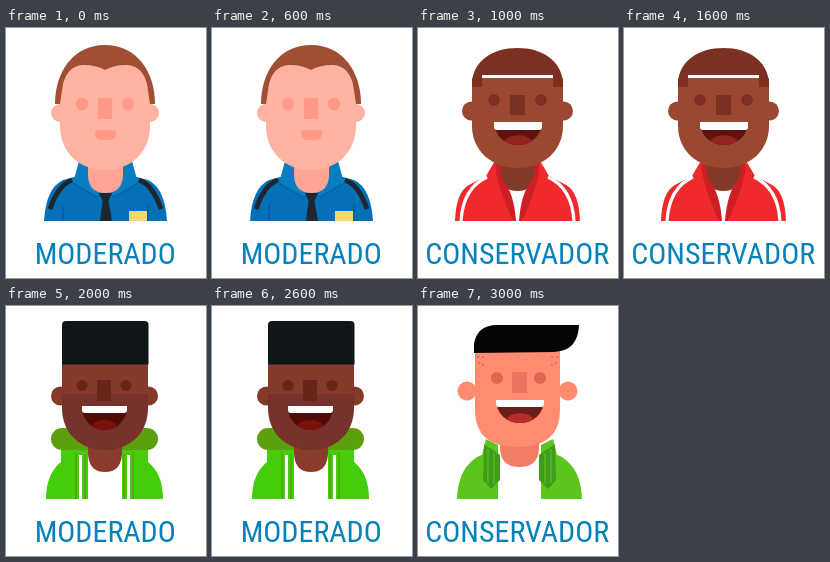
An HTML page with a canvas that plays this animation: 200 by 250 pixels, repeating every 4000 ms.

```html
<!DOCTYPE html>
<html lang="es">
<head>
<meta charset="utf-8">
<style>
html, body { margin: 0; width: 100%; height: 100%; overflow: hidden; background: #fff; }
canvas { display: block; width: 200px; height: 250px; }
</style>
</head>
<body>
<canvas id="stage" width="200" height="250"></canvas>
<script>
const ctx = document.getElementById('stage').getContext('2d');
const HOLD = 1000;

function shape(color, d) {
  ctx.fillStyle = color;
  ctx.fill(new Path2D(d));
}

function line(color, width, d) {
  ctx.strokeStyle = color;
  ctx.lineWidth = width;
  ctx.stroke(new Path2D(d));
}

function box(color, x, y, w, h, r = 0) {
  ctx.fillStyle = color;
  ctx.beginPath();
  ctx.roundRect(x, y, w, h, r);
  ctx.fill();
}

function dot(color, x, y, r) {
  ctx.fillStyle = color;
  ctx.beginPath();
  ctx.arc(x, y, r, 0, Math.PI * 2);
  ctx.fill();
}

// Runs a drawing twice, the second time flipped about the vertical line x = axis.
function mirror(axis, draw) {
  draw();
  ctx.save();
  ctx.translate(2 * axis, 0);
  ctx.scale(-1, 1);
  draw();
  ctx.restore();
}

function smile(x, y, w, teeth, depth, dark, tongue) {
  ctx.save();
  ctx.beginPath();
  ctx.roundRect(x, y, w, depth, [0, 0, w / 2, w / 2]);
  ctx.clip();
  box(dark, x, y, w, depth);
  ctx.fillStyle = tongue;
  ctx.beginPath();
  ctx.ellipse(x + w / 2, y + depth, w * 0.32, depth * 0.42, 0, 0, Math.PI * 2);
  ctx.fill();
  ctx.restore();
  box('#fff', x, y, w, teeth, [0, 0, 3, 3]);
}

function caption(text) {
  ctx.fillStyle = '#0582bb';
  ctx.textAlign = 'center';
  ctx.fontStretch = 'condensed';
  ctx.font = '30px "Roboto Condensed", Roboto, sans-serif';
  ctx.fillText(text, 99.2, 236);
}

function officer() {
  const skin = '#ffb3a0', shade = '#fe9a87', blue = '#0470b7', navy = '#20262e';
  shape(blue, 'M38 193Q40 160 57 152L72 148L73 135H126L127 148L142 152Q159 160 161 193Z');
  mirror(99.5, () => {
    line(navy, 5, 'M66 152Q52 157 44 181');
    shape('#0a7cc0', 'M73 133L67 155L91 169L99 163L82 136Z');
    line('#035a98', 1, 'M67 155L91 169L99 163');
    line('#035a98', 1.2, 'M57 176V193');
  });
  shape('#ffa593', 'M82 130H117V148Q116 165 99.5 165T82 148Z');
  shape(navy, 'M93 165H106L102.5 173L106 193H94L96.5 173Z');
  box('#fbd66b', 123, 183, 18, 10);
  mirror(99, () => dot(skin, 54, 85, 9));
  shape('#a04e34', 'M49 76C49 44 67 17 99 17S149 44 149 76Z');
  shape(skin, 'M54 76L57 56Q62 37 78 37Q90 37 99 42Q108 37 120 37Q136 37 141 56L144 76V98C144 124 125 142 99 142S54 124 54 98Z');
  mirror(99, () => dot(shade, 76, 76, 6.3));
  box(shade, 92, 70, 14, 21);
  box(shade, 89, 102, 21, 10, [2, 2, 6, 6]);
}

function athlete() {
  const skin = '#9b4833', shade = '#7b3021', red = '#f0292d', dark = '#cd2026';
  shape(red, 'M37 193Q38 164 51 157L68 148L78 131H121L131 148L148 157Q161 164 162 193Z');
  shape('#fff', 'M82 142H117L104 193H95Z');
  shape('#843a28', 'M82 128H117V146Q116 163 99.5 163T82 146Z');
  mirror(99.5, () => {
    shape(dark, 'M78 130Q74 147 95 193H98Q96 165 85 152Q81 144 83 133Z');
    line('#fff', 3.2, 'M69 149Q45 160 43 193');
  });
  mirror(99.5, () => dot(skin, 53.5, 83, 9.5));
  shape(skin, 'M54 50H145V98C145 123 125 140 99.5 140S54 123 54 98Z');
  shape(shade, 'M54 59V54C56 33 74 20 99.5 20S143 33 145 54V59H135V47H64V59Z');
  mirror(99.5, () => dot(shade, 76, 72, 5.8));
  box(shade, 92, 67, 15, 20);
  smile(76, 94, 48, 8, 23, '#5f120e', '#94231f');
}

function flatTop() {
  const skin = '#853a29', beard = '#76322a', shade = '#672419', green = '#43cd0b', hood = '#5ba00f';
  mirror(98.5, () => {
    shape(green, 'M55 142H82V193H40Q40 168 55 156Z');
    line(hood, 1.5, 'M70 146V193M79 148V193');
    line('#fff', 3, 'M74.5 149V193');
  });
  box(hood, 45, 122, 107, 22, 11);
  shape('#fff', 'M82 144H116V193H82Z');
  shape('#8b3d2b', 'M82 128H116V148Q115 166 99 166T82 148Z');
  mirror(98.5, () => dot(skin, 54.5, 90, 9.5));
  shape(skin, 'M56 50H142V100H56Z');
  shape(beard, 'M56 88H142V102C142 128 123 144 99 144S56 128 56 102Z');
  box('#101617', 56, 15, 86.5, 43.5, [4, 4, 0, 0]);
  mirror(98, () => dot(shade, 76, 79.5, 5.5));
  box(shade, 91, 74, 14, 21);
  smile(76, 100, 45, 7, 24, '#500a07', '#7d100c');
}

function quiff() {
  const skin = '#ff8b71', shade = '#df6652', green = '#5bc51d', dark = '#3f9c1d';
  mirror(101.5, () => {
    shape(green, 'M68 133L80 139V193H39Q40 169 51 158Q57 151 64 149Z');
    shape(dark, 'M66 138L82 149V174L73 183L65 174Z');
    line(green, 1.2, 'M70 143V177M76 147V178');
  });
  shape('#f27d66', 'M82 126H121V143Q120 161 101.5 161T82 143Z');
  mirror(99.5, () => dot(skin, 49, 85, 9.5));
  shape(skin, 'M57 43H142V104Q142 141 99.5 141T57 104Z');
  shape('#050507', 'M56 47V38Q59 19 79 19H161Q160 45 136 46Z');
  mirror(99.5, () => {
    for (const [x, y] of [[60, 51], [65, 51], [61, 57], [65, 59]]) dot(shade, x, y, 1);
  });
  mirror(100.5, () => dot(shade, 79, 72, 6));
  box('#ed7460', 94, 66, 15, 21);
  smile(78, 94, 48, 7, 23, '#6a1f1a', '#b52c2a');
}

const scenes = [
  [officer, 'MODERADO'],
  [athlete, 'CONSERVADOR'],
  [flatTop, 'MODERADO'],
  [quiff, 'CONSERVADOR']
];

const start = performance.now();

function render() {
  const time = Math.max(0, performance.now() - start);
  const [person, label] = scenes[Math.floor(time / HOLD) % scenes.length];
  ctx.fillStyle = '#fff';
  ctx.fillRect(0, 0, 200, 250);
  person();
  caption(label);
  requestAnimationFrame(render);
}
render();
</script>
</body>
</html>
```
